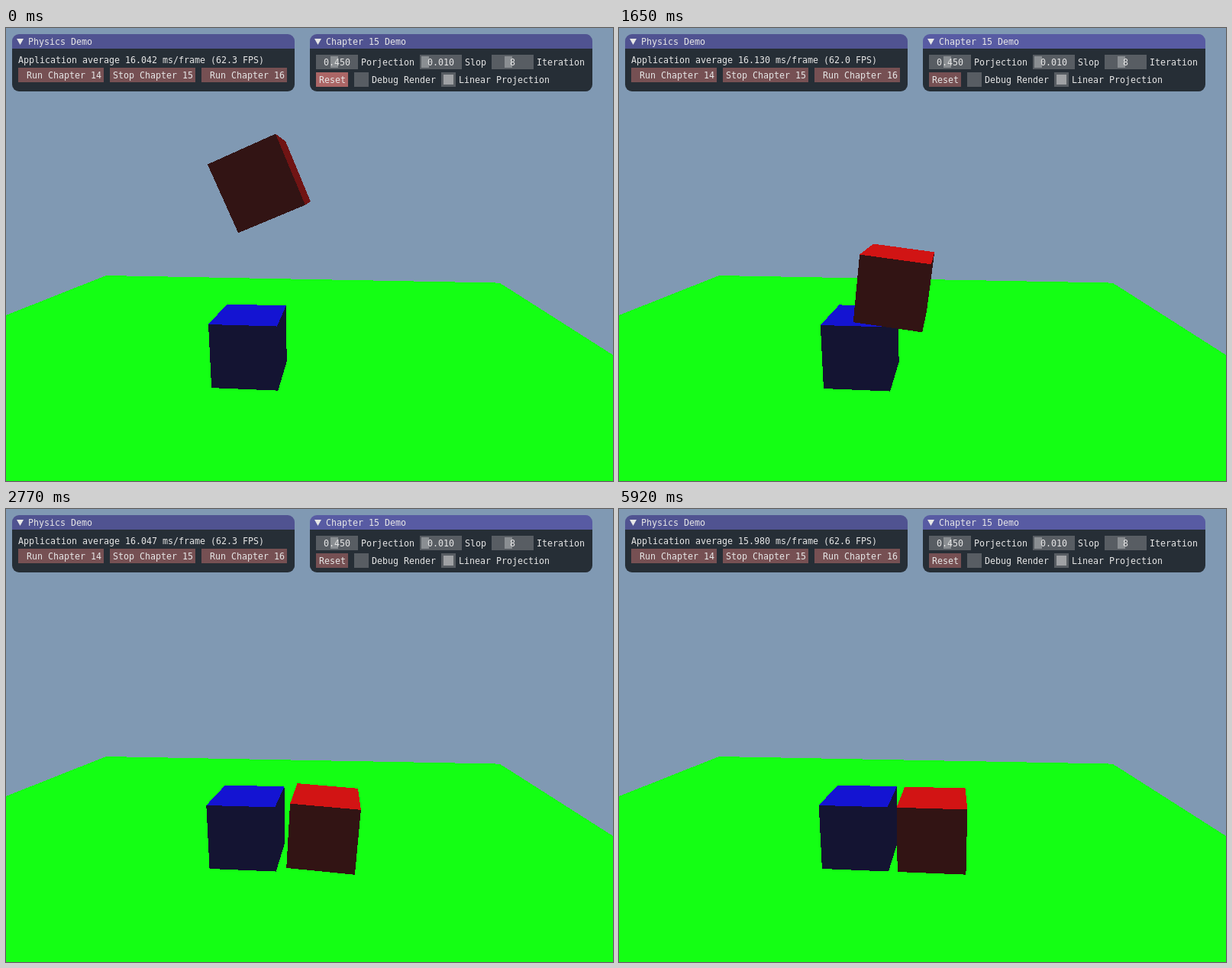
These frames come from a looping animation (795 px wide and 593 px high, 5.98 s). An HTML page:

```html
<!DOCTYPE html>
<html lang="en">
<head>
<meta charset="utf-8">
<title>Physics demo</title>
<style>
  html, body { margin: 0; width: 100%; height: 100%; overflow: hidden; background: #8099b3; }
  svg { display: block; width: 795px; height: 593px; }
  text { font: 11.63px "DejaVu Sans Mono", "Liberation Mono", monospace; fill: #e6e6e6; white-space: pre; }
  .title { fill: #505391; }
  .body { fill: #262e36; }
  .button { fill: #765053; }
  .frame { fill: #585d63; }
  .grab { fill: #8a8e92; }
  .mark { fill: #9fa1a4; }
  .arrow { fill: #e6e6e6; }
</style>
</head>
<body>
<svg viewBox="0 0 795 593">
  <g shape-rendering="crispEdges">
    <path fill="#14ff14" d="M0 376 131 324 646.5 333.6 795 428V593H0z"/>
    <g id="scene"></g>
  </g>
  <g id="ui"></g>
</svg>
<script>
const LOOP = 5980, NS = 'http://www.w3.org/2000/svg', CHAR = 7;
const scene = document.getElementById('scene'), ui = document.getElementById('ui');

function add(parent, tag, attrs, text = '') {
  const el = document.createElementNS(NS, tag);
  for (const k in attrs) el.setAttribute(k, attrs[k]);
  el.textContent = text;
  parent.append(el);
  return el;
}

// Interface
const label = (x, y, s) => add(ui, 'text', { x, y }, s);
const box = (cls, x, y, width, height) =>
  add(ui, 'rect', { class: cls, x, y, width, height, 'shape-rendering': 'crispEdges' });

function panel(x, name) {
  add(ui, 'path', { class: 'body', d: `M${x} 27h370v47a9 9 0 0 1-9 9h-352a9 9 0 0 1-9-9z` });
  const bar = add(ui, 'path', { class: 'title', d: `M${x} 27v-10a9 9 0 0 1 9-9h352a9 9 0 0 1 9 9v10z` });
  add(ui, 'path', { class: 'arrow', d: `M${x + 6} 14h9l-4.5 8z` });
  label(x + 21, 22, name);
  return bar;
}

function slider(x, grab, value, name) {
  box('frame', x, 35, 55, 19);
  box('grab', x + grab, 37, 10, 15);
  label(x + (55 - value.length * CHAR) / 2, 49, value);
  label(x + 59, 49, name);
}

function button(x, y, w, name) {
  const el = box('button', x, y, w, 19);
  label(x + w - 3 - name.length * CHAR, y + 14, name);
  return el;
}

function checkbox(x, checked, name) {
  box('frame', x, 58, 19, 19);
  if (checked) box('mark', x + 3, 61, 13, 13);
  label(x + 23, 72, name);
}

panel(8, 'Physics Demo');
const stats = label(16, 46, '');
['Run Chapter 14', 'Stop Chapter 15', 'Run Chapter 16'].forEach((s, i) => button(16 + 120 * i, 52, 112, s));

const bar = panel(398, 'Chapter 15 Demo');
slider(406, 19, '0.450', 'Porjection');
slider(542, 2, '0.010', 'Slop');
slider(636, 17, '8', 'Iteration');
const reset = button(406, 58, 42, 'Reset');
checkbox(456, false, 'Debug Render');
checkbox(570, true, 'Linear Projection');

// Camera: world axes (right, down, depth) seen from the eye
const FOCAL = 513.5, ORIGIN = [-1.4587, 1.0075, 5.654];
const RIGHT = [.9969, .0141, -.076], DOWN = [0, .977, .1828], DEPTH = [.0734, -.1732, .9312];

function project(x, y, z) {
  const p = ORIGIN.map((o, i) => o + x * RIGHT[i] + y * DOWN[i] + z * DEPTH[i]);
  return [397.5 + FOCAL * p[0] / p[2], 296.5 + FOCAL * p[1] / p[2]];
}

function turn(x, y, deg) {
  const a = deg * Math.PI / 180, c = Math.cos(a), s = Math.sin(a);
  return [x * c - y * s, x * s + y * c];
}

function makeCube(color) {
  const faces = Array.from({ length: 5 }, () => add(scene, 'polygon', {}));
  return ([cx, cy, deg]) => {
    const corners = [0, 90, 180, 270].map(quarter => {
      const [x, y] = turn(-.5, -.5, deg + quarter);
      return [cx + x, cy + y];
    });
    const front = corners.map(p => project(...p, 0));
    const back = corners.map(p => project(...p, 1));
    const paint = (face, pts, up) => {
      const [p, q, r] = pts;
      const facing = (q[0] - p[0]) * (r[1] - p[1]) > (q[1] - p[1]) * (r[0] - p[0]);
      face.setAttribute('points', facing ? pts.join(' ') : '');
      face.setAttribute('fill', color(Math.round(50 + 160 * Math.max(0, up))));
    };
    for (let i = 0; i < 4; i++) {
      const j = (i + 1) % 4;
      paint(faces[i], [back[i], back[j], front[j], front[i]], corners[j][0] - corners[i][0]);
    }
    paint(faces[4], front, 0);
  };
}
const blue = makeCube(v => `rgb(20,20,${v})`);
const red = makeCube(v => `rgb(${v},20,20)`);

// Motion: poses are [x, y, degrees] in cube widths
const DROP = 650, HIT = 1174, FLAT = 1380, LEAVE = 2280, LAND = 2470, SETTLE = 2900;
const TILT = -22.7;
const mix = (a, b, u) => a + (b - a) * u;
const span = (t, from, to) => Math.min(1, Math.max(0, (t - from) / (to - from)));

// The centre of a cube that turns about a point, which lies at (x, y) from it
function pivot(px, py, x, y, deg) {
  const [dx, dy] = turn(x, y, deg);
  return [px - dx, py - dy, deg];
}

// Rolls over the lower cube's edge while sliding along it
function tip(u) {
  const slide = .275 * u ** 4 - .03;
  return pivot(.98 + .04 * u, .03 - .04 * u, -slide, .5, 78 * u * u);
}

function redPose(t) {
  if (t < HIT) {
    const fall = Math.max(0, t - DROP) / 1000;
    return [.752, -1.995 + 4.9 * fall * fall, TILT];
  }
  if (t < FLAT) {
    const u = span(t, HIT, FLAT);
    return pivot(mix(.482, .45, u), .03 * u, -.5, .5, TILT * (1 - u));
  }
  if (t < LEAVE) return tip(span(t, FLAT, LEAVE));

  const rest = [1.622, .5, 90];
  if (t < LAND) return tip(1).map((v, i) => mix(v, rest[i], span(t, LEAVE, LAND)));
  if (t < SETTLE) {
    const rock = 4.5 * Math.sin(Math.PI * span(t, LAND, SETTLE));
    const [x, y] = pivot(rest[0] + .5, 1, .5, .5, rock);
    return [x, y, 90 + rock];
  }
  return [rest[0] - .028 * span(t, LAND, LOOP), .5, 90];
}

function bluePose(t) {
  const push = 1 - Math.exp(-Math.max(0, t - HIT) / 1000);
  const sink = t > DROP && t < 2000 ? .012 : 0;
  return [.5 - .038 * push, .5 + sink, 0];
}

// Frame time in ms, drifting between a few readings and refreshed with each picture
const READINGS = [[0, 16.042], [860, 15.915], [1650, 16.13], [2280, 16.099],
  [3550, 15.929], [4580, 16.095], [5920, 15.98], [LOOP, 15.98]];

function frameTime(t) {
  const i = READINGS.findLastIndex(r => r[0] <= t);
  const [from, a] = READINGS[i], [to, b] = READINGS[i + 1];
  const u = span(from + Math.floor((t - from) / 43) * 43, from, to);
  return mix(a, b, (1 - Math.cos(Math.PI * u)) / 2);
}

function draw(t) {
  blue(bluePose(t));
  red(redPose(t));

  const ms = frameTime(t);
  stats.textContent = `Application average ${ms.toFixed(3)} ms/frame (${(1000 / ms).toFixed(1)} FPS)`;

  bar.style.fill = t < 500 ? '#505391' : '#585ba3';
  reset.style.fill = t >= 500 && t < 640 ? '#cc8080' : t < 1400 ? '#ab6666' : '#765053';
}

const start = performance.now();
function tick() {
  draw((performance.now() - start) % LOOP);
  requestAnimationFrame(tick);
}
tick();
</script>
</body>
</html>
```
